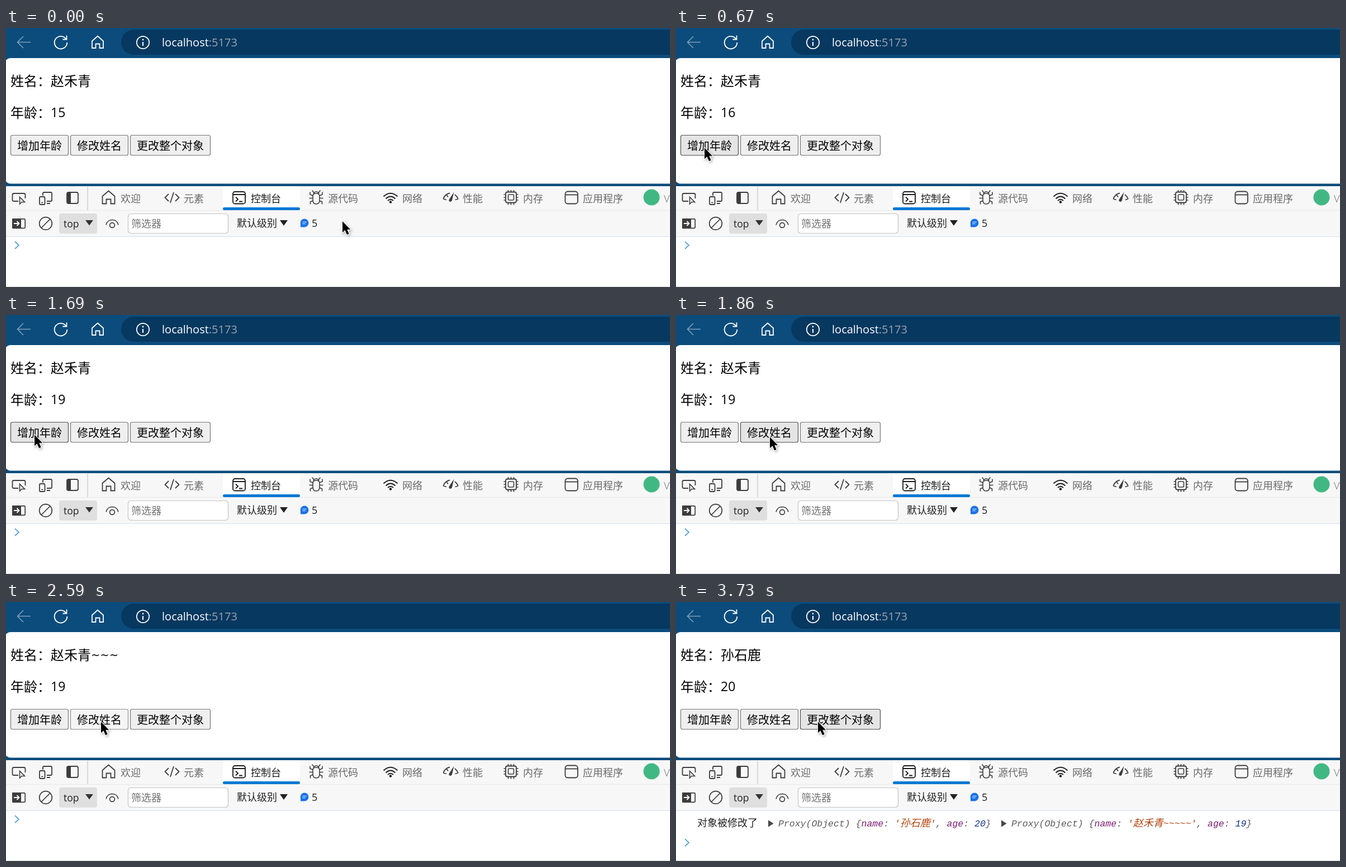
Write an HTML page with a canvas that moves like this. It is 1188 px wide and 465 px high and loops after 4500 ms.

```html
<!DOCTYPE html>
<html lang="zh-CN">
<head>
<meta charset="utf-8">
<title>localhost:5173</title>
<style>
  html, body { margin: 0; width: 100%; height: 100%; overflow: hidden; background: #fff; }
  canvas { display: block; width: 1188px; height: 465px; }
</style>
</head>
<body>
<canvas id="stage" width="1188" height="465"></canvas>
<script>
const ctx = document.getElementById('stage').getContext('2d');
const LOOP = 4500;
const SANS = "'Open Sans', 'Noto Sans CJK SC', 'Noto Sans CJK', sans-serif";
const CJK = "'Noto Sans CJK SC', 'Noto Sans CJK', sans-serif";
const MONO = "'Liberation Mono', 'Noto Sans CJK SC', 'Noto Sans CJK', monospace";
const FIRST = '赵禾青', SECOND = '孙石鹿';
const BLUE = '#0b4c7c', ICON = '#3c3c3c';

// press, release, delay of the highlight
const clicks = [
  [600, 670], [1100, 1170], [1260, 1320], [1390, 1450],
  [2140, 2200], [2290, 2350], [2440, 2500], [2590, 2680, 30], [2860, 2920],
  [3660, 3730]
];

// time, x, y of the pointer tip
const path = [
  [30, 602, 347], [320, 80, 228], [350, 80, 228], [510, 51, 215],
  [1690, 51, 215], [1860, 168, 219], [1960, 168, 219], [2110, 170, 215],
  [2950, 170, 215], [3120, 242, 217], [3210, 242, 217], [3340, 254, 215]
];

const buttons = [
  [8, 104, '增加年龄'], [115, 104, '修改姓名'], [222, 144, '更改整个对象']
];

const tabs = [
  [205, '欢迎'], [318, '元素'], [438, '控制台'], [576, '源代码'], [709, '网络'],
  [817, '性能'], [925, '内存'], [1032, '应用程序'], [1177, 'V']
];

function text(str, x, y, size, color, family = SANS, style = '') {
  ctx.font = `${style} ${size}px ${family}`;
  ctx.fillStyle = color;
  ctx.fillText(str, x, y);
  return x + ctx.measureText(str).width;
}

function rect(x, y, w, h, color) {
  ctx.fillStyle = color;
  ctx.fillRect(x, y, w, h);
}

function box(x, y, w, h, r, fill, line, width = 1) {
  ctx.beginPath();
  ctx.roundRect(x, y, w, h, r);
  if (fill) { ctx.fillStyle = fill; ctx.fill(); }
  if (line) { ctx.strokeStyle = line; ctx.lineWidth = width; ctx.stroke(); }
}

function line(d, color = ICON, width = 1.8) {
  ctx.strokeStyle = color;
  ctx.lineWidth = width;
  ctx.stroke(new Path2D(d));
}

function shape(d, color) {
  ctx.fillStyle = color;
  ctx.fill(new Path2D(d));
}

function circle(x, y, r, fill, stroke, width = 1.8) {
  ctx.beginPath();
  ctx.arc(x, y, r, 0, Math.PI * 2);
  if (fill) { ctx.fillStyle = fill; ctx.fill(); }
  if (stroke) { ctx.strokeStyle = stroke; ctx.lineWidth = width; ctx.stroke(); }
}

function pointerAt(t) {
  let prev = path[0];
  for (const key of path) {
    if (t < key[0]) {
      if (key === prev) break;
      const u = (t - prev[0]) / (key[0] - prev[0]);
      const e = u * u * (3 - 2 * u);
      return [prev[1] + (key[1] - prev[1]) * e, prev[2] + (key[2] - prev[2]) * e];
    }
    prev = key;
  }
  return [prev[1], prev[2]];
}

function drawAddressBar() {
  rect(0, 0, 1188, 284, BLUE);
  box(206, 3, 1040, 45, 22.5, '#073860');
  line('M44 25.5H21M31 15L20.500 25.500L31 36', '#7f9fb9', 1.6);
  line('M107.500 20A11.300 11.300 0 1 0 109.300 26M108.500 13.500V20.500H101.500', '#fff', 1.8);
  line('M154 23.500L164 14.500L174 23.500V36H167.500V28.500H160.500V36H154Z', '#fff', 1.8);
  circle(245, 26, 11.2, null, '#fff', 1.7);
  line('M245 25V32', '#fff', 2);
  circle(245, 21, 1.4, '#fff');
  const x = text('localhost', 279, 33, 20, '#fff');
  text(':5173', x, 33, 20, '#9ba3ad');
}

function drawPage(state) {
  box(-2, 54, 1200, 225.5, 10, '#fff');
  text('姓名：', 8, 104, 24, '#000', CJK, '350');
  text(state.name, 80, 104, 24, '#000', CJK, '350');
  text('~'.repeat(state.tildes), 152, 102, 19.5, '#000', "'DejaVu Sans', sans-serif");
  text('年龄：', 8, 161, 24, '#000', CJK, '350');
  text(String(state.age), 80, 160, 23, '#000');

  const [px, py] = state.pointer;
  for (const [x, w, label] of buttons) {
    const hover = px >= x && px < x + w && py >= 192 && py < 228;
    const [fill, edge] = !hover ? ['#efefef', '#767676']
      : state.press ? ['#f5f5f5', '#8d8d8d'] : ['#e5e5e5', '#4f4f4f'];
    box(x + 0.5, 192.5, w - 1, 36, 3, fill, edge, 1.2);
    text(label, x + 12, 218.5, 20, '#000', CJK, '350');
  }
}

function drawTabIcons() {
  // inspect, device, dock
  line('M22 311H14Q11.500 311 11.500 308.500V299.500Q11.500 297 14 297H32Q34.500 297 34.500 299.500V306');
  line('M24.500 303.500V316L28 312.500H33.500Z', ICON, 1.6);
  line('M66 301V297Q66 295 68 295H80Q82 295 82 297V309Q82 311 80 311H73M73 315H79');
  box(60, 303, 9.5, 14, 2, null, ICON, 1.8);
  line('M63 313.500H66.500', ICON, 1.5);
  box(109, 295, 20, 20, 3, null, ICON, 1.8);
  rect(109, 295, 7, 20, ICON);
  rect(145.5, 285, 1.2, 42, '#c4c4c4');
  // welcome, elements
  line('M172.500 302L183.500 292.500L194.500 302V315.500H187.500V307.500H179.500V315.500H172.500Z');
  line('M291 298L284.500 304.500L291 311M303 298L309.500 304.500L303 311M300 295L294 314');
  // console
  box(406, 294, 22, 21.5, 3.5, null, '#1b1b1b', 1.8);
  line('M406 299H428M411 303.500L415 307.500L411 311.500M417 311.500H423', '#1b1b1b');
  // bug
  line('M549 302Q549 297 555 297Q561 297 561 302V309Q561 316 555 316Q549 316 549 309Z'
    + 'M550.500 298V295L547.500 291.500M559.500 298V295L562.500 291.500M551 296Q555 291.500 559 296'
    + 'M549 305.500H542.500M561 305.500H567.500M549 301L544 299V294.500M561 301L566 299V294.500'
    + 'M549 310L544.500 312V316.500M561 310L565.500 312V316.500', ICON, 1.6);
  // network
  line('M675.500 302.500Q688 291 700.500 302.500M679.500 306.500Q688 298.500 696.500 306.500M683 310Q688 305.500 693 310', '#1b1b1b', 2);
  circle(688, 312.500, 2.2, '#1b1b1b');
  // performance
  line('M782.500 307Q785 298.500 794 296.500M803 299Q807 302 809 307M782.500 307L788 308.500M809 307L803.500 308.500M788.500 300L791 303.500', ICON, 1.8);
  shape('M801.500 294.500L798 309.500Q796.500 313 793.500 311.500Q791.500 309.500 793 307.500Z', ICON);
  // memory
  box(894, 294.500, 19, 19, 3, null, ICON, 1.8);
  box(898.5, 299, 10, 10, 2, null, ICON, 1.6);
  for (const d of [-5, 0, 5]) {
    line(`M${903.5 + d} 291V294M${903.5 + d} 314V317.500M890.500 ${304 + d}H894M913 ${304 + d}H916.500`, ICON, 1.7);
  }
  // application
  box(1000.5, 293.5, 22.5, 22, 4.5, null, ICON, 1.8);
  line('M1000.500 299.500H1023');
  circle(1155, 304, 14.5, '#41b883');
}

function drawFilterRow() {
  box(11.8, 342.800, 22.4, 16.5, 1.5, null, ICON, 1.7);
  rect(11, 342, 16, 18, ICON);
  line('M14 351H23.500M19.500 347L23.500 351L19.500 355', '#fff', 1.8);
  circle(71, 351, 11.3, null, ICON, 1.7);
  line('M63 359L79 343', ICON, 1.7);
  box(95, 333, 68, 36, 4, '#dfdfdf');
  text('top', 103, 358, 17.5, '#222');
  shape('M142 345H156L149 354.500Z', '#333');
  line('M179 353.500C182 341.500 198 341.500 201 353.500', ICON, 1.7);
  circle(190, 354, 4.4, null, ICON, 1.7);
  box(218.5, 333.5, 179, 35, 5, '#fff', '#c4c4c4', 1.2);
  text('筛选器', 224, 358, 18, '#757575', CJK, '350');
  text('默认级别', 413, 357, 18, '#222', CJK, '350');
  shape('M490 345H504L497 355Z', '#222');
  circle(534, 350, 7.4, '#1a73e8');
  shape('M527 350V357.500H534Z', '#1a73e8');
  line('M530.500 348.500H537.500M530.500 351.500H535.500', '#fff', 1.2);
  text('5', 547, 357, 18, '#222');
}

function drawTools() {
  rect(0, 284, 1188, 91, '#f7f7f7');
  rect(388, 284, 138, 40, '#fff');
  rect(0, 327, 1188, 1, '#e9e9e9');
  box(388, 322, 138, 5, 2.5, '#0078d4');
  tabs.forEach(([x, label], i) =>
    text(label, x, 312.5, 18, i === 2 ? '#1b1b1b' : '#6a6a6a', i === 8 ? SANS : CJK, '350'));
  drawTabIcons();
  drawFilterRow();
  rect(0, 374, 1188, 1, '#d6e1f4');
  rect(0, 375, 1188, 90, '#fff');
  rect(0, 464, 1188, 1, '#dcdcdc');
}

function logObject(x, name, age) {
  const grey = '#5b5b5b', key = '#7d1b70', str = '#b5450f', num = '#10328f';
  shape(`M${x} 391.500V404L${x + 9.5} 397.700Z`, '#4a4a4a');
  const parts = [
    ['Proxy(Object) {', grey], ['name', key], [': ', grey], [`'${name}'`, str],
    [', ', grey], ['age', key], [': ', grey], [age, num], ['}', grey]
  ];
  let pos = x + 18;
  for (const [s, color] of parts) {
    // wide glyphs are set slightly larger than the fixed-width ones
    for (const run of s.match(/[\u4e00-\u9fff]+|[^\u4e00-\u9fff]+/g)) {
      const size = run > '\u4e00' ? 18 : 16.5;
      pos = text(run, pos, 403, size, color, MONO, 'italic');
    }
  }
}

function drawConsole(replaced) {
  const y = replaced ? 432 : 390;
  line(`M16 ${y - 6.5}L23 ${y}L16 ${y + 6.5}`, '#56a3e2', 1.8);
  if (!replaced) return;
  text('对象被修改了', 38, 402.5, 18, '#222', CJK, '350');
  logObject(165, SECOND, '20');
  logObject(582, FIRST + '~~~~~', '19');
}

function drawPointer([x, y], glow) {
  ctx.save();
  ctx.translate(x, y);
  const arrow = 'M0 0V20L4.500 16L8 24L11.700 22.400L8.300 14.700H14.200Z';
  ctx.save();
  ctx.shadowColor = 'rgba(0,0,0,.35)';
  ctx.shadowBlur = 4;
  ctx.shadowOffsetX = 1.5;
  ctx.shadowOffsetY = 2;
  line(arrow, '#fff', 2.2);
  ctx.restore();
  shape(arrow, '#000');
  if (glow) {
    ctx.globalCompositeOperation = 'multiply';
    circle(0, 0, 18, '#fdf66c');
    ctx.globalCompositeOperation = 'lighten';
    circle(0, 0, 18, '#865a14');
  }
  ctx.restore();
}

function draw(t) {
  const done = clicks.filter(c => t >= c[1]).length;
  const press = clicks.find(c => t >= c[0] && t < c[1]);
  const replaced = done === clicks.length;
  const state = {
    press,
    pointer: pointerAt(t),
    name: replaced ? SECOND : FIRST,
    age: replaced ? 20 : 15 + Math.min(done, 4),
    tildes: replaced ? 0 : Math.max(0, done - 4)
  };
  drawAddressBar();
  drawPage(state);
  drawTools();
  drawConsole(replaced);
  drawPointer(state.pointer, press && t >= press[0] + (press[2] || 0));
}

const start = performance.now();
function tick() {
  draw((performance.now() - start) % LOOP);
  requestAnimationFrame(tick);
}
tick();
</script>
</body>
</html>
```
